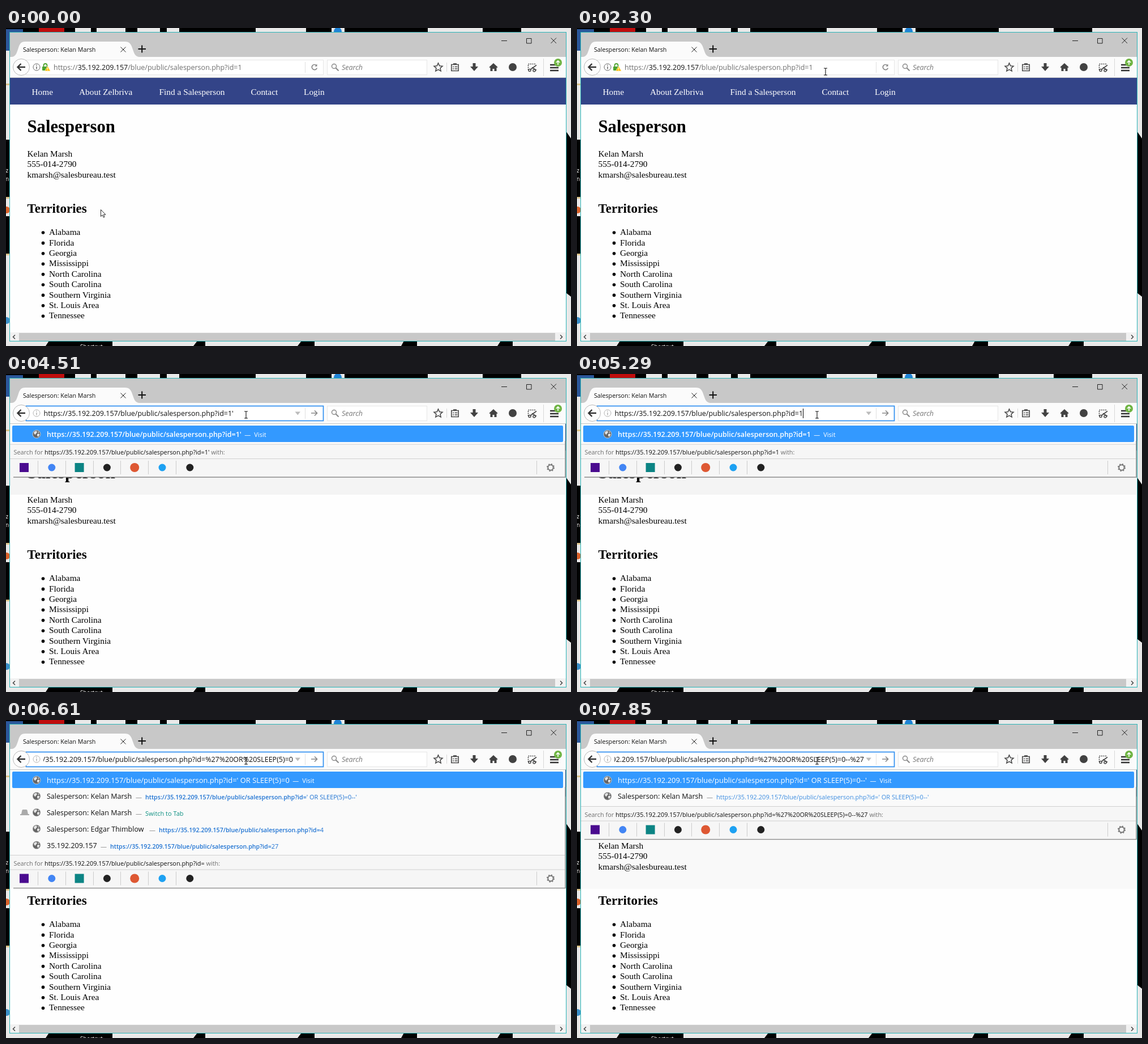
An HTML page that plays this animation: 998x561 px, repeating every 8 s.

```html
<!DOCTYPE html>
<html lang="en">
<head>
<meta charset="utf-8">
<title>Salesperson</title>
<style>
html, body { margin: 0; width: 100%; height: 100%; overflow: hidden; background: #000; }
svg { display: block; width: 998px; height: 561px; }
text { white-space: pre; font-family: "Open Sans", "Noto Sans", sans-serif; fill: #111; }
.page text { font: 15.36px "Liberation Serif", serif; fill: #000; }
.page .nav text { fill: #fff; }
.page .h1 { font-size: 30.72px; font-weight: bold; }
.page .h2 { font-size: 23.04px; font-weight: bold; }
.url { font-size: 12.5px; }
.line { fill: none; stroke: #4a4a4a; stroke-width: 1.6; }
.dark { fill: #424242; }
.thin { fill: none; stroke: #222; stroke-width: 1; }
.name { font-size: 12.5px; }
.link { font-size: 11px; fill: #1d72d2; }
.strong { font-size: 10.65px; font-weight: 600; }
.dash { font-size: 11px; fill: #888; }
.visit { font-size: 11px; font-weight: 400; }
.dim { fill: #6e6e6e; }
</style>
</head>
<body>
<svg viewBox="0 0 998 561">
  <defs>
    <clipPath id="field"><rect x="66" y="57" width="443" height="25"/></clipPath>
    <g id="globe">
      <circle r="7" fill="#666" stroke="#ddd" stroke-width=".8"/>
      <path d="M-5-3Q-3-6 0-5.500L1-3-1-1-2 1-4 0ZM1 0 4-1 5.500 1 3 5 1 3ZM2-5 5-3 3-2Z" fill="#e4e4e4"/>
    </g>
  </defs>

  <g id="desktop"><rect width="998" height="561"/></g>

  <rect x="7" y="8" width="982" height="544" fill="#fefefe"/>
  <rect x="7" y="8" width="982" height="44" fill="#c8c8c8"/>
  <rect x="7" y="51" width="982" height="37" fill="#fbfbfb"/>
  <path d="M8 51.500C17 51 18 46 21 38 24 28 26 24 34 24H210C218 24 221 28 224 38 227 46 228 51 238 51.500Z" fill="#fbfbfb"/>
  <text x="30" y="42" font-size="10.7">Salesperson: Kelan Marsh</text>
  <path class="thin" d="M202.500 33.500l9 9m0-9l-9 9M875 22.500h10M919.500 18.500h8.500v8.500h-8.500ZM962.500 17.500l9.500 9.500m0-9.500l-9.500 9.500"/>
  <path d="M233.500 37h13.500M240.200 30.500v13" stroke="#111" stroke-width="2"/>
  <path d="M7 87.500H989" stroke="#c6c6c6"/>

  <g class="page">
    <rect x="7" y="88" width="982" height="47" fill="#348"/>
    <g class="nav" id="nav"></g>
    <text class="h1" x="37.500" y="184">Salesperson</text>
    <text x="37.500" y="227">Kelan Marsh</text>
    <text x="37.500" y="245.300">555-014-2790</text>
    <text x="37.500" y="263.500">kmarsh@salesbureau.test</text>
    <text class="h2" x="37.500" y="326">Territories</text>
    <g id="list"></g>
  </g>
  <rect x="7" y="537" width="982" height="15" fill="#f1f1f1"/>
  <rect x="23" y="538" width="947" height="14" fill="#c8c8c8"/>
  <path d="M16 541.500l-3.500 3.500 3.500 3.500M979 541.500l3.500 3.500-3.500 3.500" fill="none" stroke="#444" stroke-width="1.5"/>

  <g id="toolbar">
    <rect id="frame" x="35.500" y="56.500" width="525" height="26" fill="#fff"/>
    <path d="M528.500 60v19" stroke="#e0e0e0"/>
    <circle cx="27" cy="69" r="14.500" fill="#fdfdfd" stroke="#b8b8b8"/>
    <path d="M34 69H21M26.500 63l-6 6 6 6" fill="none" stroke="#333" stroke-width="2.400"/>
    <g id="info" stroke="#666">
      <circle cx="54" cy="69" r="6" fill="none"/>
      <path d="M54 68v4.500M54 65v1.500" stroke-width="1.500"/>
    </g>
    <g id="lock">
      <path d="M66.500 69v-3a3 3 0 0 1 6 0v3" fill="none" stroke="#4da32f" stroke-width="1.800"/>
      <rect x="64" y="68" width="10" height="7" rx="1" fill="#4da32f"/>
      <path d="M73.500 67l5 9h-10Z" fill="#fdc00f" stroke="#fff" stroke-width=".6"/>
      <path d="M73.500 70v3m0 .8v1" stroke="#fff"/>
    </g>
    <path id="drop" d="M510.500 66.500h9.500l-4.750 6Z" fill="#bcbcbc"/>
    <g id="reload" fill="none" stroke="#888" stroke-width="1.700">
      <path d="M548.500 66.200a4.600 4.600 0 1 0 .8 4.300"/>
      <path d="M549.500 63.500v4.200h-4.200Z" fill="#888" stroke="none"/>
    </g>
    <path id="go" d="M539 69h10M545 64.500l4.500 4.500-4.500 4.500" fill="none" stroke="#888" stroke-width="1.700"/>
    <rect id="select" x="84" y="60" width="333" height="18" fill="#39f"/>
    <g clip-path="url(#field)"><text class="url" id="url" y="74"></text></g>
    <path id="caret" d="M0 61v17" stroke="#000"/>

    <rect x="567.500" y="56.500" width="176" height="26" fill="#fff" stroke="#e6e6e6"/>
    <circle cx="579.500" cy="67.500" r="4" fill="none" stroke="#888" stroke-width="1.500"/>
    <path d="M582.500 70.500l5 5" stroke="#888" stroke-width="2"/>
    <text x="593" y="74" font-size="12.500" font-style="italic" fill="#777" style="fill:#777">Search</text>

    <path class="line" d="M763.500 62l2.200 4.700 5.200.6-3.900 3.500 1.100 5.100-4.600-2.600-4.600 2.600 1.100-5.100-3.900-3.500 5.200-.6Z"/>
    <path d="M778.500 61v16M949.500 54v31" stroke="#d8d8d8"/>
    <path class="line" d="M786.800 64.500h12.400v11h-12.400ZM790 63h6M789 68.500h2m1.500 0h5M789 72h2m1.500 0h5"/>
    <path class="dark" d="M824.500 62h5v6h4.500l-7 8-7-8h4.500Z"/>
    <path class="dark" d="M861 62l7.500 7-1.200 1.300-.8-.7V76h-4v-4h-3v4h-4v-6.400l-.8.700-1.200-1.300Z"/>
    <circle class="dark" cx="895" cy="69" r="7"/>
    <path class="line" stroke-dasharray="2 1.500" d="M935 63.500h-12.500v11"/>
    <path class="line" d="M937 65.500l-11 8M937 74.500l-8-5"/>
    <circle class="line" cx="925" cy="74.500" r="2"/><circle class="line" cx="933" cy="75" r="2"/>
    <path d="M961 65h15M961 70h15M961 75h15" stroke="#333" stroke-width="2.400"/>
    <circle cx="975" cy="61" r="7" fill="#6fb443"/>
    <path d="M975 65v-7M971.800 61l3.200-3.200 3.200 3.200" fill="none" stroke="#fff" stroke-width="1.600"/>
  </g>

  <rect id="haze" x="7" width="981"/>
  <g id="popup">
    <rect id="panel" x="7" y="88" width="981" fill="#fafafa"/>
    <path id="shade" fill="none" stroke="#8c8c8c" stroke-width="1.600"/>
    <rect x="11" y="91" width="973" height="29" rx="2" fill="#39f"/>
    <use href="#globe" x="54" y="106"/>
    <text id="top" x="72" y="111" style="fill:#fff"></text>
    <g id="rows"></g>
    <g id="footer">
      <rect x="7" width="980" height="57" fill="#f6f6f6"/>
      <path d="M7 0H987M7 25.500H987" stroke="#d0d0d0"/>
      <text id="query" x="13.500" y="18" font-size="10.870"></text>
      <g id="engines"></g>
      <circle cx="962" cy="41" r="4.700" fill="none" stroke="#777" stroke-width="2"/>
      <circle cx="962" cy="41" r="6.200" fill="none" stroke="#777" stroke-width="1.600" stroke-dasharray="2.400 2.470"/>
    </g>
  </g>

  <rect x="6.500" y="7.500" width="983" height="545" fill="none" stroke="#2ab5b8"/>
  <path id="arrow" d="M.5.500v12l2.800-2.600 2 4.300 1.900-.9-2-4.100h3.700Z" fill="#fff" stroke="#111" stroke-width=".9"/>
  <path id="beam" d="M-3-6h2.200L0-5.300.8-6H3M0-5.300V5.300M-3 6h2.200L0 5.300.8 6H3" fill="none" stroke="#111" stroke-width="1.100"/>
</svg>

<script>
const $ = id => document.getElementById(id);
const add = (id, markup) => { $(id).innerHTML += markup; };
const rect = (x, y, w, h, fill) => `<rect x="${x}" y="${y}" width="${w}" height="${h}" fill="${fill}"/>`;

// Desktop edges around the window
const pale = '#e9e9e9';
const strip = (spans, y, h) => spans.map(([a, b]) => rect(a, y, b - a, h, pale)).join('');
add('desktop',
  strip([[122, 150], [160, 211], [232, 272], [284, 306], [441, 530], [575, 598], [745, 842], [910, 998]], 0, 8) +
  [[0, 76, 70], [188, 338, 331], [352, 522, 515], [545, 703, 698], [726, 874, 868], [895, 998, 998]]
    .map(([a, b, c]) => `<path d="M${a} 552H${b}L${c} 561H${a}Z" fill="${pale}"/>`).join('') +
  `<path d="M989 0H998V195L989 182ZM989 467L998 474V561H989Z" fill="${pale}"/>` +
  [[40, 157], [204, 40], [300, 32], [400, 161]].map(([y, h]) => rect(0, y, 6, h, y === 204 ? '#000' : pale)).join('') +
  [[98, 3], [298, 3], [398, 3]].map(([y, h]) => rect(0, y, 6, h, '#dcc48c')).join('') +
  rect(0, 2, 30, 38, '#2b579a') + rect(58, 0, 45, 8, '#c00d0d') +
  '<circle cx="586" cy="6" r="7" fill="#1f83d6"/><circle cx="1" cy="321" r="6" fill="#d9622b"/><circle cx="1" cy="516" r="6" fill="#3b8fc9"/>' +
  '<text x="-3" y="255" font-size="10" style="fill:#fff">iz</text><text x="-1" y="270" font-size="10" style="fill:#fff">ne</text>' +
  '<text x="131" y="566" font-size="10" style="fill:#fff">Shortcut</text>');

[[45.5, 'Home'], [129, 'About Zelbriva'], [270.5, 'Find a Salesperson'], [432.5, 'Contact'], [526, 'Login']]
  .forEach(([x, label]) => add('nav', `<text x="${x}" y="118">${label}</text>`));

['Alabama', 'Florida', 'Georgia', 'Mississippi', 'North Carolina', 'South Carolina',
 'Southern Virginia', 'St. Louis Area', 'Tennessee'].forEach((area, i) => {
  const y = 365.2 + i * 18.4;
  add('list', `<circle cx="65.500" cy="${y - 4.2}" r="2.800"/><text x="76" y="${y}">${area}</text>`);
});

// Address suggestions
const host = '35.192.209.157';
const path = '/blue/public/salesperson.php?id=';
const base = 'https://' + host + path;
const link = (tail, bold = true) => `<tspan class="${bold ? 'strong' : ''}">${base}</tspan>${tail}`;
const row = (i, name, x, body, id = '') => {
  const y = 110.5 + i * 28.8;
  add('rows', `<g><use href="#globe" x="54" y="${y - 5}"/><text class="name" x="72" y="${y}">${name}</text>
    <text class="dash" x="${x - 17}" y="${y + 1}">—</text><text class="link" id="${id}" x="${x}" y="${y + 1}">${body}</text></g>`);
};
const attack = "' OR SLEEP(5)=0--'";
row(1, 'Salesperson: Kelan Marsh', 246, '', 'first');
row(2, 'Salesperson: Kelan Marsh', 246, '<tspan fill="#0d9082">Switch to Tab</tspan>');
row(3, 'Salesperson: Edgar Thimblow', 270, link('4'));
row(4, host, 184, link('27'));
$('rows').children[2 - 1].innerHTML += '<path d="M25 168v-2h2l1.500-7q.5-1 2-1h5q1.500 0 2 1l1.500 7h2v2Z" fill="#aaa"/>';

[['#4a0a8f', 1], ['#4285f4', 0], ['#0c8484', 1], ['#222', 0], ['#de5833', 0], ['#1da1f2', 0], ['#222', 0]]
  .forEach(([color, square], i) => {
    const x = 32 + i * 48.8;
    add('engines', (square ? rect(x - 8, 33, 16, 16, color) : `<circle cx="${x}" cy="41" r="${i === 4 ? 8 : 6.5}" fill="${color}"/>`) +
      `<path d="M${i < 6 ? Math.round(x + 24) + .5 : 937.5} 29v24" stroke="#ccc"/>`);
  });

// Timed tracks: [start, value...]
const partial = '%27%20OR%20SLEEP(5)=0', full = partial + '--%27';
const tracks = {
  cursor: [[0, 167, 320, 0], [130, 215, 361, 0], [340, 54, 168, 1], [480, 41, 112, 0], [610, 105, 60, 0],
    [740, 215, 24, 0], [870, 366, 6, 0], [1000, 440, 16, 0], [1130, 495, 34, 0], [1260, 480, 50, 0],
    [1390, 462, 68, 1], [1520, 452, 72, 1], [1650, 446, 75, 1], [1930, 442, 98, 0], [2060, 444, 119, 0],
    [2190, 442, 98, 0], [2300, 439, 77, 1], [2450, 430, 74, 1], [2580, 424, 72, 1]],
  border: [[0, '#e6e6e6', 1], [1390, '#d0d0d0', 1], [1520, '#bcbcbc', 1], [1930, '#e6e6e6', 1],
    [2450, '#d0d0d0', 1], [2580, '#bcbcbc', 1], [2870, '#2f8ff0', 1.7]],
  mode: [[0, 'idle'], [2870, 'select'], [3550, 'focus'], [4510, 'typed']],
  caret: [[0, 0], [3550, 1], [3980, 0], [4770, 1], [6080, 0], [6210, 1], [6610, 0]],
  tail: [[0, '1'], [4510, "1'"], [5290, '1'], [5550, ''], [6610, partial], [7140, full]],
  query: [[0, "1'"], [5290, '1'], [5550, ''], [7140, full]],
  rows: [[0, 0], [5550, 4], [7720, 1]],
  match: [[0, 1], [7440, 0]],
  haze: [[0, 0, 0, 0], [4510, 182, 31, .04], [5550, 0, 0, 0], [7720, 211, 87, .02]]
};
const at = (track, t) => track.filter(step => step[0] <= t).pop().slice(1);
const show = (id, on) => $(id).setAttribute('visibility', on ? 'visible' : 'hidden');
const set = (id, attrs) => { for (const k in attrs) $(id).setAttribute(k, attrs[k]); };

function drawField(mode, tail, caret) {
  const typed = mode === 'typed', idle = mode === 'idle';
  const url = $('url');
  url.innerHTML = idle ? `<tspan class="dim">https://</tspan>${host}<tspan class="dim">${path}${tail}</tspan>` : base + tail;
  url.style.fill = mode === 'select' ? '#fff' : '#111';
  const width = url.getComputedTextLength();
  const x = typed ? Math.min(66.5, 507 - width) : 84;
  set('url', { x });
  set('caret', { transform: `translate(${Math.round(x + width) + .5})` });
  set('info', { opacity: typed ? .5 : 1 });
  show('caret', caret);
  show('select', mode === 'select');
  show('lock', !typed);
  show('drop', !idle);
  show('reload', !typed);
  show('go', typed);
}

function drawPopup(open, tail, query, rows, match) {
  $('popup').style.display = open ? '' : 'none';
  if (!open) return;
  const y = [124, 152.5, , , 238.5][rows], bold = tail.length < 3;
  set('footer', { transform: `translate(0 ${y})` });
  set('panel', { height: y - 30 });
  set('shade', { d: `M988 118V${y + 58}H13` });
  $('top').innerHTML = `<tspan font-size="${bold ? 12.47 : 12.9}" font-weight="${bold ? 600 : 400}">${base}${decodeURIComponent(tail)}</tspan>` +
    '<tspan class="visit" dx="5.500">—</tspan><tspan class="visit" dx="6">Visit</tspan>';
  $('query').innerHTML = `<tspan class="dim">Search for </tspan>${base}${query}<tspan class="dim"> with:</tspan>`;
  $('first').innerHTML = link(attack, match);
  $('first').style.fill = match ? '' : '#3b8ce0';
  [...$('rows').children].forEach((g, i) => { g.style.display = i < rows ? '' : 'none'; });
}

let last = '';
function frame() {
  const t = performance.now() % 8000;
  const now = {};
  for (const k in tracks) now[k] = at(tracks[k], t);
  const key = JSON.stringify(now);
  if (key !== last) {
    last = key;
    const [x, y, beam] = now.cursor;
    const [mode] = now.mode, [tail] = now.tail;
    show('arrow', !beam);
    show('beam', beam);
    set(beam ? 'beam' : 'arrow', { transform: `translate(${x} ${y})` });
    set('frame', { stroke: now.border[0], 'stroke-width': now.border[1] });
    set('haze', { y: now.haze[0], height: now.haze[1], opacity: now.haze[2] });
    drawField(mode, tail, now.caret[0]);
    drawPopup(mode === 'typed', tail, now.query[0], now.rows[0], now.match[0]);
  }
  requestAnimationFrame(frame);
}
frame();
</script>
</body>
</html>
```
